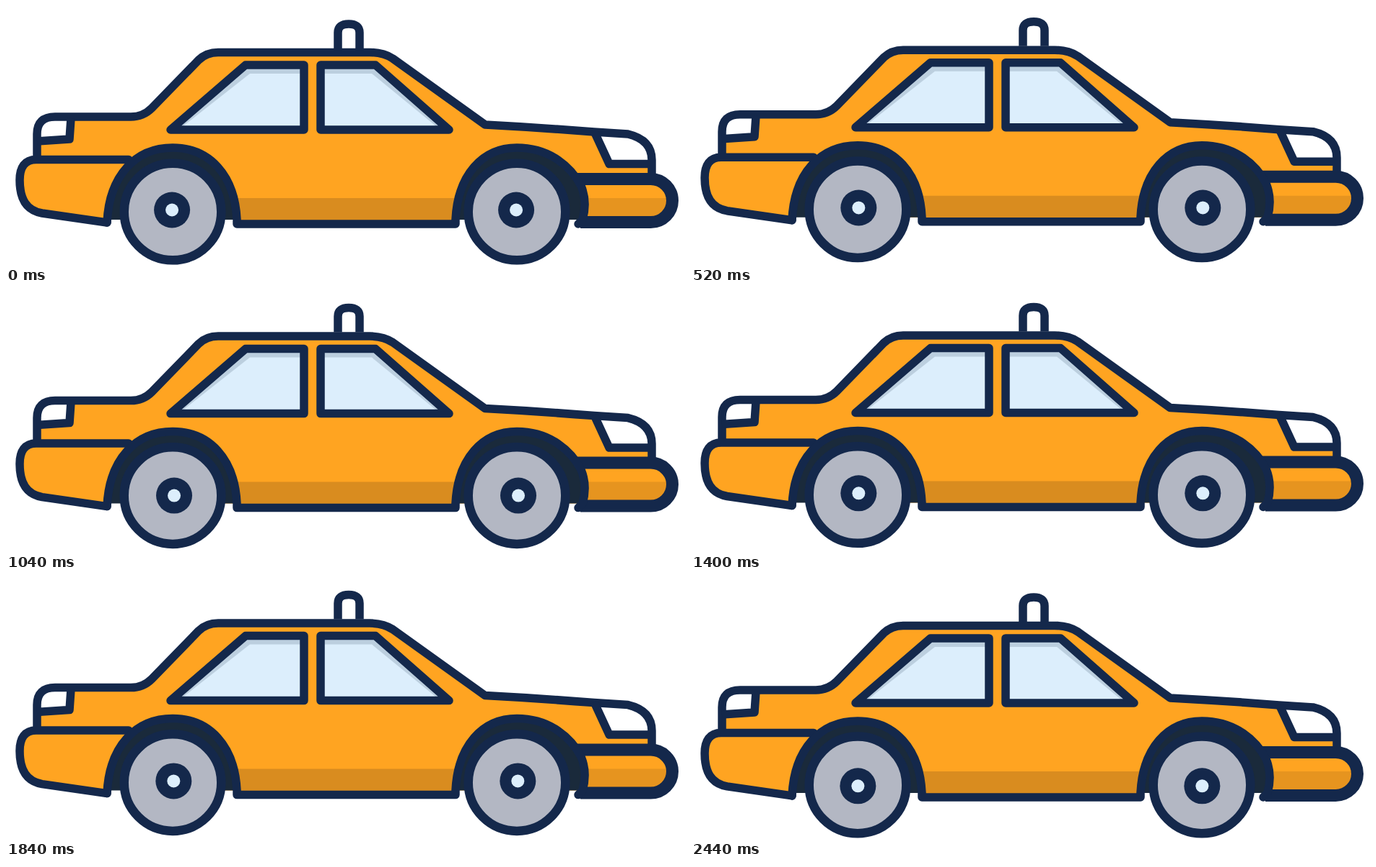
Recreate the animation shown at these times as an HTML page. Size 941x360 px, loop 2480 ms.

```html
<!DOCTYPE html>
<html lang="en">
<head>
<meta charset="utf-8">
<title>Taxi</title>
<style>
  html, body { margin: 0; width: 100%; height: 100%; overflow: hidden; background: #fff; }
  svg { display: block; width: 941px; height: 360px; }
  .line { fill: none; stroke: #14284b; stroke-width: 11.5; stroke-linecap: round; stroke-linejoin: round; }
  .paint { fill: #ffa421; }
  .shade { fill: #d98c1f; }
  .arch { fill: #1a2a3b; }
  .white { fill: #fff; }
  .glass { fill: #dceefc; }
  .dim { fill: #bccfdf; }
  .dark { fill: #14284b; }
</style>
</head>
<body>
<svg viewBox="0 0 941 360" xmlns="http://www.w3.org/2000/svg">
  <defs>
    <g id="tyre">
      <circle r="67.3" fill="#b3b7c3" stroke="#14284b" stroke-width="12.5"/>
    </g>
    <g id="cap">
      <circle class="dark" r="25"/>
      <circle class="glass" r="9"/>
    </g>
  </defs>
  <g id="car">
    <!-- roof lamp -->
    <path class="line white" style="fill:#fff;stroke-linecap:butt" d="M460 59V37Q460 25 475 25T490 37V59"/>

    <!-- body -->
    <path class="paint" d="M43 213V178Q43 154 68 154H173Q190 154 202 142L267 75Q278 64.500 294 64.500H504Q523 64.500 536 73L664 165Q740 169 815 175L862 178Q895 186 895 214V240H795V297H160V213Z"/>
    <path class="shade" d="M318 267H625V299H318Z"/>
    <path class="white" d="M43 188V178Q43 154 68 154L91 157 88 185Z"/>
    <path class="white" d="M815 175L862 178Q895 186 895 219H836Z"/>
    <path class="line" d="M43 213V178Q43 154 68 154H173Q190 154 202 142L267 75Q278 64.500 294 64.500H504Q523 64.500 536 73L664 165Q740 169 815 175L862 178Q895 186 895 214V240"/>
    <path class="line" style="stroke-linecap:butt" d="M43 188L88 185 90 156M815 174L836 219.500H895"/>

    <!-- bumpers -->
    <path class="paint" d="M172 213.500H42C26 213.500 19 224 19 242C19 268 28 284 50 288L140 301Z"/>
    <path class="line" d="M170 213.500H42C26 213.500 19 224 19 242C19 268 28 284 50 288L140 301"/>
    <path class="paint" d="M795 240.500H893.500A30 30 0 0 1 893.500 300.500H795Z"/>
    <path fill="#e6941f" d="M795 267H923A30 30 0 0 1 893.500 300.500H795Z"/>
    <path class="line" style="stroke-width:17;stroke-linecap:butt" d="M786 240.500H893.500A30 30 0 0 1 893.500 300.500H796"/>

    <!-- wheel arches and sill -->
    <path class="arch" d="M140 297C143 235 180 197 231 197S317 235 320 297Z"/>
    <path class="arch" d="M623 297C626 235 660 197 708 197C755 197 784 225 797 250Q806 272 800 297Z"/>
    <path class="line" d="M140 301C143 235 180 197 231 197S317 235 320 297V303H623V297C626 235 660 197 708 197C755 197 784 225 797 250Q806 272 799 297L793 303"/>

    <!-- windows -->
    <path class="dim" d="M332 82H413V172H228Z"/>
    <path class="glass" d="M338 94H413V172H239Z"/>
    <path class="line" d="M332 82H413V172H228Z"/>
    <path class="dim" d="M436 82H512L614 172H436Z"/>
    <path class="glass" d="M436 94H507L602 172H436Z"/>
    <path class="line" d="M436 82H512L614 172H436Z"/>

    <use href="#tyre" x="231" y="286"/>
    <use href="#tyre" x="708" y="286"/>
    <g id="caps">
      <use href="#cap" x="231" y="285.4"/>
      <use href="#cap" x="708" y="285.4"/>
    </g>
  </g>
</svg>
<script>
  const LOOP = 2480, STEP = 40;
  const BOUNCE = 400, LIFT = 5.5;
  const SPIN = 440, START = -116, WOBBLE = 2.1;
  const car = document.getElementById('car');
  const caps = document.getElementById('caps');

  const move = (el, x, y) => el.setAttribute('transform', `translate(${x.toFixed(2)} ${y.toFixed(2)})`);

  function draw(now) {
    const t = Math.floor((now % LOOP) / STEP) * STEP;
    const phase = (t % BOUNCE) / BOUNCE;
    const rise = 1 - Math.abs(2 * phase - 1);
    const turn = (START / 360 + t / SPIN) * 2 * Math.PI;
    move(car, 0, -LIFT * rise);
    move(caps, WOBBLE * Math.cos(turn), WOBBLE * Math.sin(turn));
  }

  const begin = performance.now();
  function tick() {
    draw(performance.now() - begin);
    requestAnimationFrame(tick);
  }
  tick();
</script>
</body>
</html>
```
